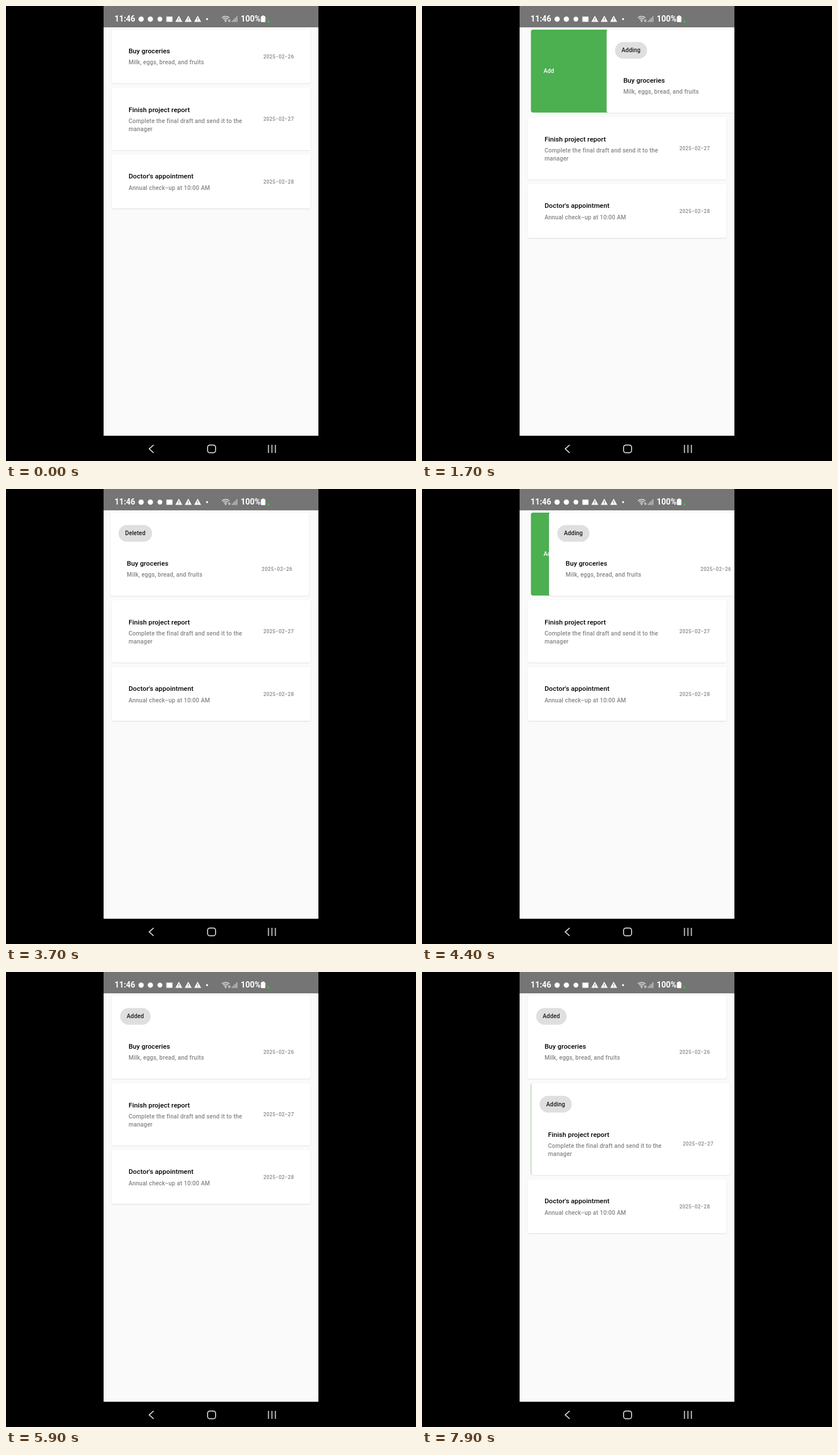
An HTML page with a canvas that plays this animation: 710x789 px, repeating every 8000 ms.

```html
<!DOCTYPE html>
<html lang="en">
<head>
<meta charset="utf-8">
<title>Swipe list</title>
<style>
html, body { margin: 0; width: 100%; height: 100%; overflow: hidden; background: #000; }
canvas { display: block; width: 710px; height: 789px; }
</style>
</head>
<body>
<canvas id="stage"></canvas>
<script>
const W = 710, H = 789, LOOP = 8000, STEP = 100;
const canvas = document.getElementById("stage");
const ctx = canvas.getContext("2d");
const ratio = window.devicePixelRatio || 1;
canvas.width = W * ratio;
canvas.height = H * ratio;

const FONT = "Roboto, 'Noto Sans', sans-serif";
const SCREEN = { x: 169, y: 37, w: 372, h: 708.5 };
const CARD = { x: 183.2, w: 344.5, top: 40.5, gap: 7.6, r: 3.6 };
const LINE = 14.5, CHIP_SPACE = 51, INSET = 5.4;

const TYPE = {
  title: { size: 11.61, gap: 0.07, color: "#000" },
  body: { size: 10.16, gap: 0.19, color: "#868686" },
  date: { size: 8.71, gap: 0.36, color: "#868686" },
  chip: { size: 10.16, gap: 0.09, color: "#1c1b1f" },
  action: { size: 10.16, gap: 0, color: "#fff" },
  status: { size: 13.9, gap: 0, color: "#fff", weight: 700 }
};

const TASKS = [
  { title: "Buy groceries", lines: ["Milk, eggs, bread, and fruits"], date: "2025\u221202\u221226" },
  { title: "Finish project report",
    lines: ["Complete the final draft and send it to the", "manager"], date: "2025\u221202\u221227" },
  { title: "Doctor's appointment", lines: ["Annual check\u2212up at 10:00 AM"], date: "2025\u221202\u221228" }
];

// Each swipe follows the finger along path (time, offset), then springs back after release.
const SWIPES = [
  { row: 0, verb: "Add", release: 1850, end: 2400,
    path: [[1000, 6], [1100, 42], [1200, 92], [1300, 124], [1400, 135.7], [1500, 135.7], [1700, 136.5]] },
  { row: 0, verb: "Delet", release: 3490, end: 3900,
    path: [[3200, -8], [3300, -55], [3400, -100], [3490, -106]] },
  { row: 0, verb: "Add", release: 5350, end: 5900,
    path: [[4200, 6], [4500, 52], [4800, 105], [5000, 123.5], [5100, 123.5], [5300, 127]] },
  { row: 0, verb: "Add", release: 7050, end: 7600,
    path: [[6200, 6], [6500, 50], [6800, 102], [7000, 124]] },
  { row: 1, verb: "Add", release: 9000, end: 9500, path: [[7900, 6]] }
];

function follow(path, t) {
  for (let i = 1; i < path.length; i++) {
    const [t0, x0] = path[i - 1], [t1, x1] = path[i];
    if (t < t1) return x0 + (x1 - x0) * (t - t0) / (t1 - t0);
  }
  return path[path.length - 1][1];
}

function spring(ms) {
  const s = ms / 1000, decay = 11, freq = Math.sqrt(230.2 - decay * decay);
  return Math.exp(-decay * s) * (Math.cos(freq * s) + decay / freq * Math.sin(freq * s));
}

function rowState(row, t) {
  const past = SWIPES.filter(s => s.row === row && s.path[0][0] <= t);
  const swipe = past[past.length - 1];
  if (!swipe) return { x: 0, label: "" };
  if (t < swipe.release) return { x: follow(swipe.path, t), label: swipe.verb + "ing" };
  const start = follow(swipe.path, swipe.release);
  return {
    x: t < swipe.end ? start * spring(t - swipe.release) : 0,
    label: swipe.verb + "ed"
  };
}

function setType(type) {
  ctx.font = `${type.weight || 500} ${type.size}px ${FONT}`;
  ctx.letterSpacing = type.gap + "px";
}

// Draws text centred vertically on cy.
function text(str, x, cy, type, align = "left") {
  setType(type);
  ctx.textAlign = align;
  ctx.fillStyle = type.color;
  ctx.fillText(str, x, cy + type.size * 0.3415);
}

function box(x, y, w, h, r, color) {
  ctx.fillStyle = color;
  ctx.beginPath();
  ctx.roundRect(x, y, w, h, r);
  ctx.fill();
}

function disc(x, y, r, color) {
  ctx.fillStyle = color;
  ctx.beginPath();
  ctx.arc(x, y, r, 0, Math.PI * 2);
  ctx.fill();
}

function stroke(points, width, color) {
  ctx.strokeStyle = color;
  ctx.lineWidth = width;
  ctx.beginPath();
  points.forEach(([x, y]) => ctx.lineTo(x, y));
  ctx.stroke();
}

function drawAction(x, y, h) {
  if (Math.abs(x) <= INSET) return;
  const left = CARD.x + INSET, width = CARD.w - 2 * INSET;
  const add = x > 0;
  box(left, y + 0.5, width, h - 1, CARD.r, add ? "#4caf50" : "#f44336");
  if (add) text("Add", left + 21.8, y + h / 2, TYPE.action);
  else text("Delete", left + width - 21.8, y + h / 2, TYPE.action, "right");
}

function drawChip(label, x, y) {
  setType(TYPE.chip);
  box(x, y, ctx.measureText(label).width + 22.8, 29, 14.5, "#dfdfdf");
  text(label, x + 11.3, y + 14.5, TYPE.chip);
}

function drawCard(task, state, y) {
  const shift = state.label ? CHIP_SPACE : 0;
  const base = 79.2 + LINE * task.lines.length;
  const h = base + shift, x = CARD.x + state.x;
  drawAction(state.x, y, h);

  ctx.save();
  ctx.shadowColor = "rgba(0,0,0,0.15)";
  ctx.shadowBlur = 1.6 * ratio;
  ctx.shadowOffsetY = 0.6 * ratio;
  box(x, y, CARD.w, h, CARD.r, "#fff");
  ctx.restore();

  if (state.label) drawChip(state.label, x + 14.5, y + 21.9);
  const top = y + shift;
  text(task.title, x + 29, top + 37.8, TYPE.title);
  task.lines.forEach((line, i) => text(line, x + 29, top + 57.5 + i * LINE, TYPE.body));
  text(task.date, x + 262.5, top + base / 2 + 0.2, TYPE.date);
  return h;
}

function drawWarning(x) {
  ctx.fillStyle = "#fff";
  ctx.beginPath();
  ctx.moveTo(x, 16.8);
  ctx.lineTo(x + 6, 27.4);
  ctx.lineTo(x - 6, 27.4);
  ctx.fill();
  ctx.fillStyle = "#757575";
  ctx.fillRect(x - 0.6, 20.6, 1.2, 3.2);
  ctx.fillRect(x - 0.6, 24.7, 1.2, 1.2);
}

function drawStatus() {
  box(SCREEN.x, 0, SCREEN.w, SCREEN.y, 0, "#757575");
  text("11:46", 188, 22.6, TYPE.status);
  [[234, 4.6], [250, 4.6], [266.5, 4.2]].forEach(([x, r]) => disc(x, 22.8, r, "#fff"));
  box(277.7, 18.4, 10.6, 9, 0, "#fff");
  [299.3, 315.6, 331.9].forEach(drawWarning);
  disc(348.2, 22.8, 1.8, "#fff");

  ctx.strokeStyle = "#eee";
  ctx.lineWidth = 1.3;
  [3.2, 6.2, 9.2].forEach(r => {
    ctx.beginPath();
    ctx.arc(380.3, 27, r, -Math.PI * 0.75, -Math.PI * 0.25);
    ctx.stroke();
  });
  disc(380.3, 26.6, 1.2, "#eee");
  box(385.2, 23.6, 1.1, 4, 0, "#eee");
  box(387, 23.6, 1.1, 4, 0, "#eee");
  for (let i = 0; i < 4; i++) {
    const h = 2.8 + i * 2.4;
    box(391.3 + i * 2.6, 27.8 - h, 1.4, h, 0.4, "#d4d4d4");
  }

  text("100%", 406.6, 22.6, TYPE.status);
  box(443.4, 16.4, 3.8, 2, 0.6, "#fff");
  box(441.4, 17.5, 7.8, 10.6, 1.6, "#fff");
  disc(454.4, 27, 2, "#19c94b");
}

function drawNav() {
  const color = "#d6d6d6";
  stroke([[255.6, 761.2], [248, 768], [255.6, 774.8]], 1.7, color);
  ctx.strokeStyle = color;
  ctx.lineWidth = 1.7;
  ctx.beginPath();
  ctx.roundRect(349.1, 761.3, 13.8, 13.4, 4);
  ctx.stroke();
  [454.5, 460.5, 466.5].forEach(x => stroke([[x, 761], [x, 775]], 1.7, color));
}

function draw(t) {
  ctx.setTransform(ratio, 0, 0, ratio, 0, 0);
  ctx.fillStyle = "#000";
  ctx.fillRect(0, 0, W, H);
  drawStatus();
  drawNav();

  ctx.save();
  ctx.beginPath();
  ctx.rect(SCREEN.x, SCREEN.y, SCREEN.w, SCREEN.h);
  ctx.clip();
  box(SCREEN.x, SCREEN.y, SCREEN.w, SCREEN.h, 0, "#fafafa");
  let y = CARD.top;
  TASKS.forEach((task, i) => { y += drawCard(task, rowState(i, t), y) + CARD.gap; });
  ctx.restore();
}

let start = null;
function tick(now) {
  if (start === null) start = now;
  const t = (now - start) % LOOP;
  draw(Math.floor(t / STEP) * STEP);
  requestAnimationFrame(tick);
}
draw(0);
requestAnimationFrame(tick);
</script>
</body>
</html>
```
